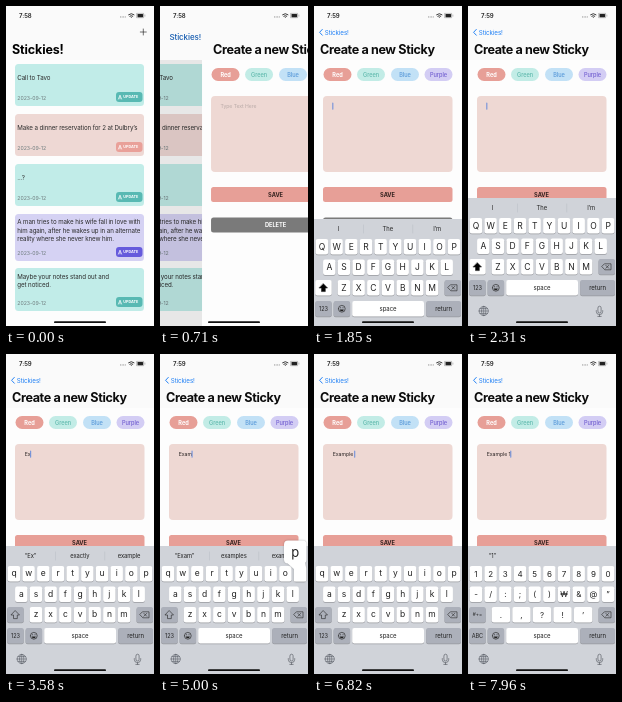
Animation, 148 px wide and 320 px high, one loop 8000 ms. Source, as an HTML page with a canvas:

```html
<!DOCTYPE html>
<html lang="en">
<head>
<meta charset="utf-8">
<title>Sticky notes</title>
<style>
  html, body { margin: 0; width: 100%; height: 100%; overflow: hidden; background: #fdfdfd; }
  canvas { display: block; width: 100vw; height: 100vh; }
</style>
</head>
<body>
<canvas id="stage"></canvas>
<script>
const W = 148, H = 320, LOOP = 8000;
const canvas = document.getElementById('stage');
const ctx = canvas.getContext('2d');
const BLUE = '#1a7df5', INK = '#222', RED = '#e79f97', PAGE = '#fdfdfd', HEADER = '#fafafa', GREY_KEY = '#acb0ba';

// ---- timeline: each entry changes part of the state and holds ----
const steps = [
  [0, { clock: '7:58', push: 0, rise: 0, focus: false, text: '', mode: 'upper', pressed: '', hints: ['I', 'The', 'I’m'] }],
  [500, { push: .12 }], [610, { push: .45 }], [710, { push: .716 }],
  [820, { push: .89 }], [930, { push: .968 }], [1050, { push: 1 }],
  [1630, { rise: .16, focus: true }], [1740, { rise: .56, clock: '7:59' }], [1850, { rise: .836 }],
  [1960, { rise: .945 }], [2070, { rise: .983 }], [2190, { rise: .995 }], [2310, { rise: 1 }],
  [2550, { pressed: 'E' }],
  [2770, { pressed: '', text: 'E', mode: 'lower' }],
  [2880, { hints: ['“E”', 'Eat', 'Even'] }],
  [3110, { pressed: 'x' }],
  [3220, { pressed: '', text: 'Ex' }],
  [3340, { hints: ['“Ex”', 'exactly', 'example'] }],
  [3700, { pressed: 'a' }],
  [3920, { pressed: '', text: 'Exa' }],
  [4150, { hints: ['“Exa”', 'exam', 'example'] }],
  [4270, { pressed: 'm' }],
  [4500, { pressed: '', text: 'Exam' }],
  [4730, { hints: ['“Exam”', 'examples', 'example'] }],
  [4870, { pressed: 'p' }],
  [5100, { pressed: '', text: 'Examp' }],
  [5210, { pressed: 'l', hints: ['“Examp”', 'examples', 'example'] }],
  [5440, { pressed: '', text: 'Exampl' }],
  [5580, { hints: ['“Exampl”', 'example', 'examples'] }],
  [5840, { pressed: 'e' }],
  [5960, { pressed: '', text: 'Example' }],
  [6100, { hints: ['“Example”', 'example', 'examples'] }],
  [6610, { pressed: 'space' }],
  [6720, { pressed: '', text: 'Example ' }],
  [6820, { hints: ['', '', ''] }],
  [7060, { mode: 'digits' }],
  [7590, { pressed: '1' }],
  [7830, { pressed: '', text: 'Example 1' }],
  [7960, { hints: ['“1”', '', ''] }]
];
const stateAt = t => Object.assign({}, ...steps.filter(s => s[0] <= t).map(s => s[1]));

// ---- drawing helpers ----
function box(x, y, w, h, r, fill) {
  ctx.fillStyle = fill;
  ctx.beginPath();
  ctx.roundRect(x, y, w, h, r);
  ctx.fill();
}

// y is the middle of the capitals
function label(str, x, y, size, color = INK, weight = 400, align = 'left', spacing = -.01) {
  ctx.font = `${weight} ${size}px Inter, "Liberation Sans", sans-serif`;
  ctx.letterSpacing = spacing * size + 'px';
  ctx.textAlign = align;
  ctx.fillStyle = color;
  ctx.fillText(str, x, y + size * .36);
  return ctx.measureText(str).width;
}

function stroke(d, color = INK, width = .7) {
  ctx.strokeStyle = color;
  ctx.lineWidth = width;
  ctx.lineCap = ctx.lineJoin = 'round';
  ctx.stroke(new Path2D(d));
}

function at(x, y, draw) {
  ctx.save();
  ctx.translate(x, y);
  draw();
  ctx.restore();
}

function page() {
  box(0, 0, W, H, 0, PAGE);
  box(0, 0, W, 54, 0, HEADER);
}

// ---- shared chrome ----
function statusBar(clock) {
  label(clock, 13, 9.7, 6.1, INK, 600);
  for (let i = 0; i < 4; i++) box(114 + i * 1.6, 10.3, 1, 1.3, .4, '#999');
  stroke('M122.6 8.7Q125.3 6.5 128 8.7M123.8 10.2Q125.3 9 126.8 10.2', INK, .9);
  box(124.8, 10.8, 1, 1, .5, INK);
  ctx.globalAlpha = .5;
  stroke('M131 7.4h6.6v4.3h-6.6zM138.9 9v1.2', INK, .5);
  ctx.globalAlpha = 1;
  box(131.5, 7.9, 5.6, 3.3, .6, INK);
}

// ---- list screen ----
const hues = {
  teal: ['#c1ece8', '#58b9b3'],
  rose: ['#eed8d4', '#e9a099'],
  violet: ['#d5d2f3', '#665bdc']
};
const notes = [
  [58, 42, 'teal', 14, ['Call to Tavo']],
  [108, 42, 'rose', 14, ['Make a dinner reservation for 2 at Dulbry’s']],
  [158, 42, 'teal', 14, ['...?']],
  [208, 47, 'violet', 8, ['A man tries to make his wife fall in love with', 'him again, after he wakes up in an alternate', 'reality where she never knew him.']],
  [262, 43, 'teal', 8.5, ['Maybe your notes stand out and', 'get noticed.']]
];

function noteCard([y, h, hue, textTop, lines]) {
  const [paper, accent] = hues[hue], bottom = y + h;
  box(9, y, 129, h, 3.5, paper);
  lines.forEach((line, i) => label(line, 11.3, y + textTop + i * 8.4, 6.2, '#2b2b2b', 400, 'left', -.015));
  label('2023-09-12', 11.3, bottom - 7.5, 5.2, '#6f7c7e');
  box(110, bottom - 14, 26.5, 10, 3, accent);
  at(112, bottom - 11.5, () => stroke('M.4 4.6L2 .6L3.6 4.6M2 2.6V4.4', '#fff', .7));
  label('UPDATE', 117.3, bottom - 9, 3.8, '#fff', 700);
}

function listScreen(push) {
  page();
  at(-44 * push, 0, () => notes.forEach(noteCard));
  box(0, 54, W, H - 54, 0, `rgba(0,0,0,${.12 * push})`);
  ctx.globalAlpha = 1 - push;
  stroke('M134.3 26h6M137.3 23v6', INK, .65);
  ctx.globalAlpha = 1;
}

// ---- editor screen ----
const pills = [
  ['Red', 9.5, RED, '#fff'],
  ['Green', 43, '#c2ece6', '#5db8ac'],
  ['Blue', 77, '#c2e1f6', '#5597d8'],
  ['Purple', 110.5, '#d3cdf4', '#715ed0']
];

function editorScreen({ push, focus, text }) {
  at(W * (1 - push), 0, () => {
    page();
    for (const [name, x, fill, color] of pills) {
      box(x, 62, 28, 13, 6.5, fill);
      label(name, x + 14, 68.6, 5.6, color, name === 'Red' ? 700 : 500, 'center');
    }
    box(9, 90, 129.5, 76, 4, '#eed8d3');
    if (!focus) label('Type Text Here', 18.5, 100, 5.1, '#b9aaa7');
    else {
      const width = label(text, 18.7, 100, 5.2, '#2a2424');
      box(18.4 + width, 96.5, .9, 7.2, .4, '#5580dc');
    }
    box(9, 181, 129.5, 15, 2.5, RED);
    label('SAVE', 73.5, 188.6, 5.7, '#33211e', 700, 'center');
    box(9, 211.5, 129.5, 15, 2.5, '#7a7a7a');
    label('DELETE', 73.5, 219, 5.7, '#fff', 700, 'center');
  });
  // The navigation title travels a little farther than the page.
  label('Create a new Sticky', 6 + W * 1.12 * (1 - push), 43.7, 12.6, '#0c0c0c', 700, 'left', -.03);
}

// The large title shrinks into the back button.
function movingTitle(p) {
  const mix = (a, b) => a + (b - a) * p;
  const weight = Math.round(mix(7, 4)) * 100;
  label('Stickies!', mix(6, 10.8), mix(43.8, 26.3), mix(12.5, 6.2), `rgb(${26 * p},${125 * p},${245 * p})`, weight);
  if (p > .9) stroke('M8.3 23.4L5.6 26.3L8.3 29.2', BLUE, .95);
}

// ---- keyboard ----
const PITCH = 14.68, GAP = 2.25, ROW_Y = [212, 232.5, 253, 274], KEY_H = 15.5;
const layouts = {
  upper: ['QWERTYUIOP', 'ASDFGHJKL', 'ZXCVBNM'],
  lower: ['qwertyuiop', 'asdfghjkl', 'zxcvbnm'],
  digits: ['1234567890', '-/:;()₩&@”', '.,?!’']
};

function keyCap(x, y, w, fill = '#fff') {
  box(x, y + .7, w, KEY_H, 2, '#989a9f');
  box(x, y, w, KEY_H, 2, fill);
}

function balloon(char, cx, y) {
  const left = Math.min(Math.max(cx - 11, 1), W - 24), top = y - 25.5;
  ctx.save();
  ctx.shadowColor = 'rgba(0,0,0,.3)';
  ctx.shadowBlur = 2;
  ctx.fillStyle = '#fff';
  ctx.beginPath();
  ctx.roundRect(left, top, 22.5, 23, 4);
  ctx.moveTo(left + 1.5, top + 21);
  ctx.lineTo(left + 21, top + 21);
  ctx.lineTo(cx + 6.2, y + 3);
  ctx.lineTo(cx + 6.2, y + KEY_H);
  ctx.lineTo(cx - 6.2, y + KEY_H);
  ctx.lineTo(cx - 6.2, y + 3);
  ctx.fill();
  ctx.restore();
  label(char, left + 11.2, top + 12, 13, INK, 400, 'center');
}

function sideKeys(mode) {
  const y = ROW_Y[2];
  keyCap(1.2, y, 16.5, mode === 'upper' ? '#fff' : GREY_KEY);
  if (mode === 'digits') label('#+=', 9.4, y + 7.7, 4.8, INK, 400, 'center');
  else {
    const arrow = 'M9.4 256.8L13.5 261H11.3V264.6H7.5V261H5.3Z';
    if (mode === 'upper') { ctx.fillStyle = '#000'; ctx.fill(new Path2D(arrow)); }
    stroke(arrow, INK, .6);
  }
  keyCap(130.5, y, 16.5, GREY_KEY);
  stroke('M136.8 257.8H143V263.8H136.8L134 260.8ZM137.9 259.4l2.8 2.8m0-2.8l-2.8 2.8', INK, .6);
}

function bottomKeys(mode, pressed) {
  const y = ROW_Y[3], mid = y + 7.8;
  keyCap(1.2, y, 16.5, GREY_KEY);
  label(mode === 'digits' ? 'ABC' : '123', 9.4, mid, 5.6, INK, 400, 'center');
  keyCap(19.6, y, 16.5, GREY_KEY);
  at(27.8, mid, () => {
    stroke('M-3.4 0a3.4 3.4 0 1 0 6.8 0a3.4 3.4 0 1 0-6.8 0M-1.2-1.2v.3M1.2-1.2v.3', INK, .65);
    ctx.fillStyle = INK;
    ctx.fill(new Path2D('M-2 .6H2Q1.6 2.5 0 2.5Q-1.6 2.5-2 .6'));
  });
  keyCap(38.2, y, 71.8, pressed === 'space' ? GREY_KEY : '#fff');
  label('space', 74, mid, 6, INK, 400, 'center');
  keyCap(112.2, y, 34.8, GREY_KEY);
  label('return', 129.6, mid, 6, INK, 400, 'center');
  at(15.7, 305, () => stroke('M-4.6 0a4.6 4.6 0 1 0 9.2 0a4.6 4.6 0 1 0-9.2 0M-2.1 0a2.1 4.6 0 1 0 4.2 0a2.1 4.6 0 1 0-4.2 0M-4.6 0H4.6M0-4.6V4.6M-3.8-2.4H3.8M-3.8 2.4H3.8', '#5c6068', .6));
  at(131.5, 305, () => stroke('M-1.6-3.2a1.6 1.6 0 0 1 3.2 0V.4a1.6 1.6 0 0 1-3.2 0ZM-3.2-.4V.4a3.2 3.2 0 0 0 6.4 0V-.4M0 3.6V5.4M-1.7 5.4H1.7', '#5c6068', .7));
}

function keyboard({ rise, mode, pressed, hints }) {
  at(0, 128 * (1 - rise), () => {
    box(0, 192, W, H, 0, '#d0d3d9');
    if (hints[1]) stroke('M49.5 198v8M98.7 198v8', '#b9bdc4', .5);
    hints.forEach((hint, i) => label(hint, 24.5 + i * 49.3, 202.3, 5.8, INK, 400, 'center'));
    let popup = null;
    layouts[mode].forEach((row, r) => {
      // Five punctuation keys share the space of seven letters.
      const pitch = row.length === 5 ? PITCH * 7 / 5 : PITCH, width = pitch - GAP;
      const size = mode === 'digits' ? 8 : 8.5;
      [...row].forEach((char, i) => {
        const cx = W / 2 + (i - (row.length - 1) / 2) * pitch, y = ROW_Y[r];
        keyCap(cx - width / 2, y, width);
        label(char, cx, y + (mode === 'lower' ? 7 : 7.8), size, INK, 400, 'center');
        if (char === pressed) popup = [char, cx, y];
      });
    });
    sideKeys(mode);
    bottomKeys(mode, pressed);
    if (popup) balloon(...popup);
  });
}

// ---- frame loop ----
function render(t) {
  const scale = devicePixelRatio || 1;
  const w = Math.round(innerWidth * scale), h = Math.round(innerHeight * scale);
  if (canvas.width !== w || canvas.height !== h) { canvas.width = w; canvas.height = h; }
  ctx.setTransform(w / W, 0, 0, h / H, 0, 0);
  const state = stateAt(t);
  if (state.push < 1) listScreen(state.push);
  if (state.push > 0) editorScreen(state);
  movingTitle(state.push);
  statusBar(state.clock);
  if (state.rise) keyboard(state);
  box(48, 315.2, 52, 1.9, 1, '#111');
}

const start = performance.now();
function tick() {
  render((performance.now() - start) % LOOP);
  requestAnimationFrame(tick);
}
tick();
</script>
</body>
</html>
```
